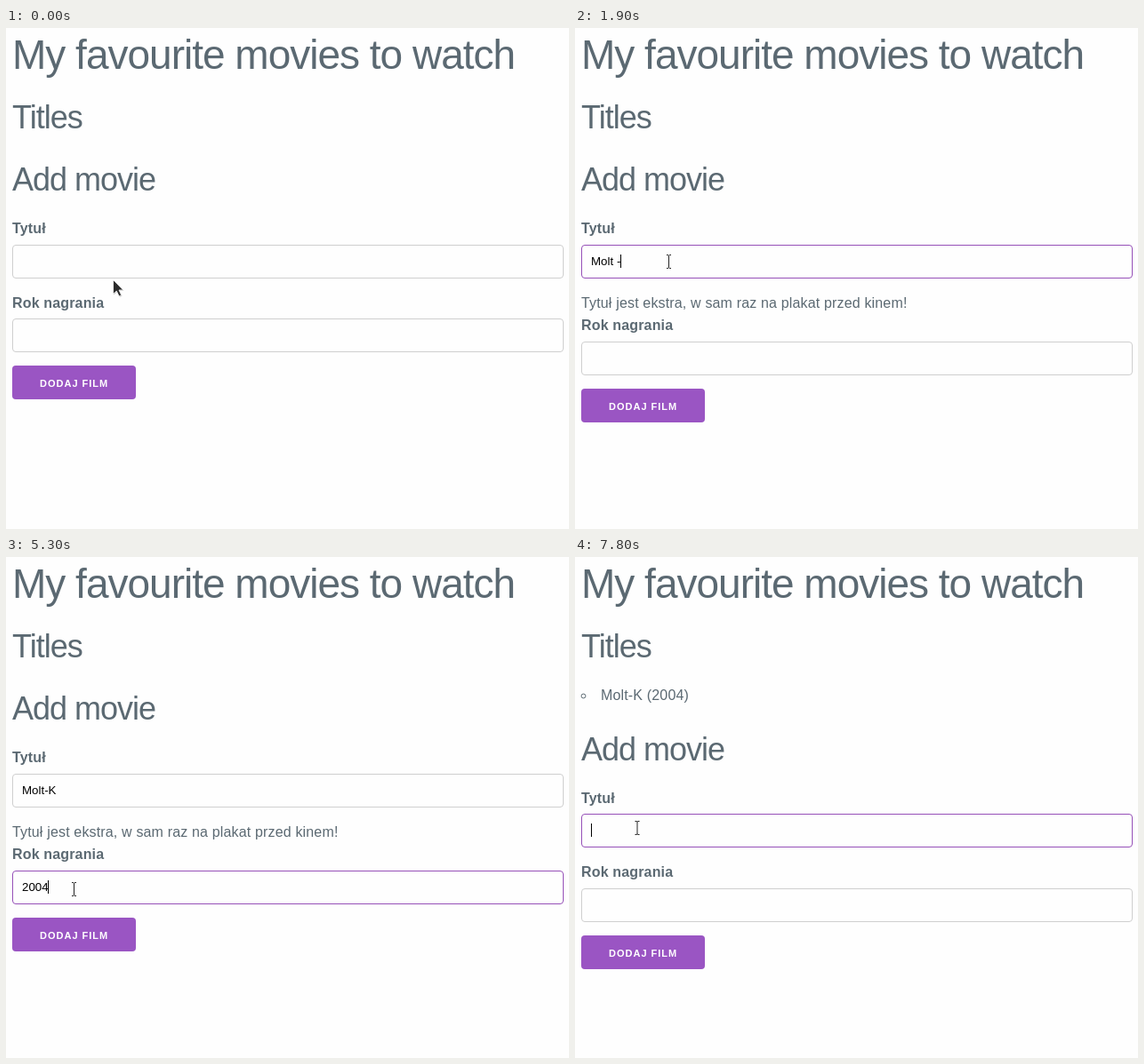
Write an HTML page that moves like this. It is 633x564 px and loops after 8000 ms.

```html
<!DOCTYPE html>
<html lang="pl">
<head>
<meta charset="utf-8">
<title>My favourite movies</title>
<style>
html, body { margin: 0; width: 100%; height: 100%; overflow: hidden; background: #fefefe; }
svg { display: block; }
text { font: 16px "Liberation Sans", Arial, sans-serif; letter-spacing: .16px; fill: #5b6972; white-space: pre; }
.h1 { font-size: 46px; letter-spacing: -1px; }
.h2 { font-size: 36px; letter-spacing: -1px; }
.label { font-weight: bold; }
.value { font-size: 13.333px; letter-spacing: 0; fill: #000; }
.button { font-size: 11px; font-weight: bold; letter-spacing: 1px; fill: #fff; }
</style>
</head>
<body>
<svg id="stage" width="633" height="564" viewBox="0 0 633 564"></svg>
<script>
const stage = document.getElementById('stage');
const pen = document.createElement('canvas').getContext('2d');
pen.font = '13.333px "Liberation Sans", Arial, sans-serif';

const LOOP = 8000, STEP = 100;
const PURPLE = '#9a55c3', SLATE = '#5b6972';
const SHORT = 'Tutuł jest za krótki. Nagrywają takie filmy?';
const GREAT = 'Tytuł jest ekstra, w sam raz na plakat przed kinem!';
const MOVIE = 'Molt-K', YEAR = '2004';

// Typed values, each held until the next time
const titles = [[0, ''], [1200, 'M'], [1400, 'Mo'], [1500, 'Mol'], [1700, 'Molt'],
  [1800, 'Molt '], [1900, 'Molt -'], [2500, 'Molt '], [2700, 'Molt'],
  [2900, 'Molt-'], [3200, MOVIE], [6700, '']];
const years = [[0, ''], [4900, '2'], [5000, '20'], [5200, '200'], [5300, YEAR], [6700, '']];
const focus = [[0, 0], [800, 1], [4600, 2], [6500, 0], [7800, 1]];
const carets = [[0, true], [2500, false], [2900, true], [3800, false], [4600, true]];

// Pointer path: time, x, y
const path = [[0, 120.5, 283.5], [100, 117, 276], [300, 105.5, 263], [3700, 105.5, 263],
  [4000, 82.5, 354], [4500, 76.5, 374], [5700, 76.5, 374], [5800, 78, 380],
  [6000, 80.5, 396], [6200, 72.5, 419], [7100, 72.5, 419], [7400, 70, 305], [LOOP, 70, 305]];

const held = (keys, t) => keys.filter(k => k[0] <= t).pop()[1];

function pointerAt(t) {
  const i = path.findIndex(k => k[0] > t);
  const [t0, x0, y0] = path[i - 1], [t1, x1, y1] = path[i];
  const p = (t - t0) / (t1 - t0);
  return [x0 + (x1 - x0) * p, y0 + (y1 - y0) * p];
}

const text = (cls, x, y, s) => `<text class="${cls}" x="${x}" y="${y}">${s}</text>`;

function field(y, value, focused, caret) {
  const x = Math.floor(18 + pen.measureText(value).width);
  return `<rect x="7.5" y="${y + .5}" width="619" height="37" rx="3.5" fill="#fefefe"
      stroke="${focused ? '#9650b8' : '#cfcfcf'}"/>` + text('value', 18, y + 23, value) +
    (focused && caret ? `<rect x="${x}" y="${y + 11}" width="1" height="15"/>` : '');
}

function pointer(x, y, beam) {
  const d = beam
    ? 'M-2.5-7.5H-.8L0-6.8L.8-7.5H2.5M0-7V7M-2.5 7.5H-.8L0 6.8L.8 7.5H2.5'
    : 'M0 0V16L3.8 12.6L6.6 18.4L9.2 17.2L6.5 11.5H11.3Z';
  const look = beam ? 'fill="none" stroke="#222"' : 'fill="#2b2b2b" stroke="#fff" stroke-width=".8"';
  const halo = beam ? 'fill="none" stroke="#fff" stroke-width="2.6"' : 'fill="#000" opacity=".2"';
  return `<g transform="translate(${x} ${y})"><path d="${d}" ${halo}
    ${beam ? '' : 'transform="translate(.8 1)"'}/><path d="${d}" ${look}/></g>`;
}

function scene(t) {
  const title = held(titles, t), active = held(focus, t), caret = held(carets, t);
  const added = t >= 6700, checked = t >= 1200 && !added;
  const shift = added ? 46 : 0;
  const top1 = added ? 289 : 244;
  const top2 = added ? 373 : checked ? 353 : 327;
  const buttonY = top2 + 53;
  const [x, y] = pointerAt(t);
  const beam = [top1, top2].some(top => y > top + 2 && y < top + 38);
  const pressed = t >= 6100 && t < 7800;

  return text('h1', 7, 46, 'My favourite movies to watch') +
    text('h2', 7, 113, 'Titles') +
    (added ? `<circle cx="9.5" cy="156.5" r="2.4" fill="none" stroke="${SLATE}"/>` +
      text('', 29, 161, `${MOVIE} (${YEAR})`) : '') +
    text('h2', 7, 183 + shift, 'Add movie') +
    text('label', 7, 231 + shift, 'Tytuł') +
    field(top1, title, active === 1, caret) +
    (checked ? text('', 7, 315, title.length < 5 ? SHORT : GREAT) : '') +
    text('label', 7, top2 - 13 + (checked || added ? 0 : 1), 'Rok nagrania') +
    field(top2, held(years, t), active === 2, caret) +
    `<rect x="7" y="${buttonY}" width="139" height="38" rx="4" fill="${pressed ? SLATE : PURPLE}"/>` +
    text('button', 38, buttonY + 24, 'DODAJ FILM') +
    pointer(x, y, beam);
}

let shown = -1;
function draw() {
  const t = Math.floor(performance.now() % LOOP / STEP) * STEP;
  if (t !== shown) stage.innerHTML = scene(shown = t);
  requestAnimationFrame(draw);
}
draw();
</script>
</body>
</html>
```
